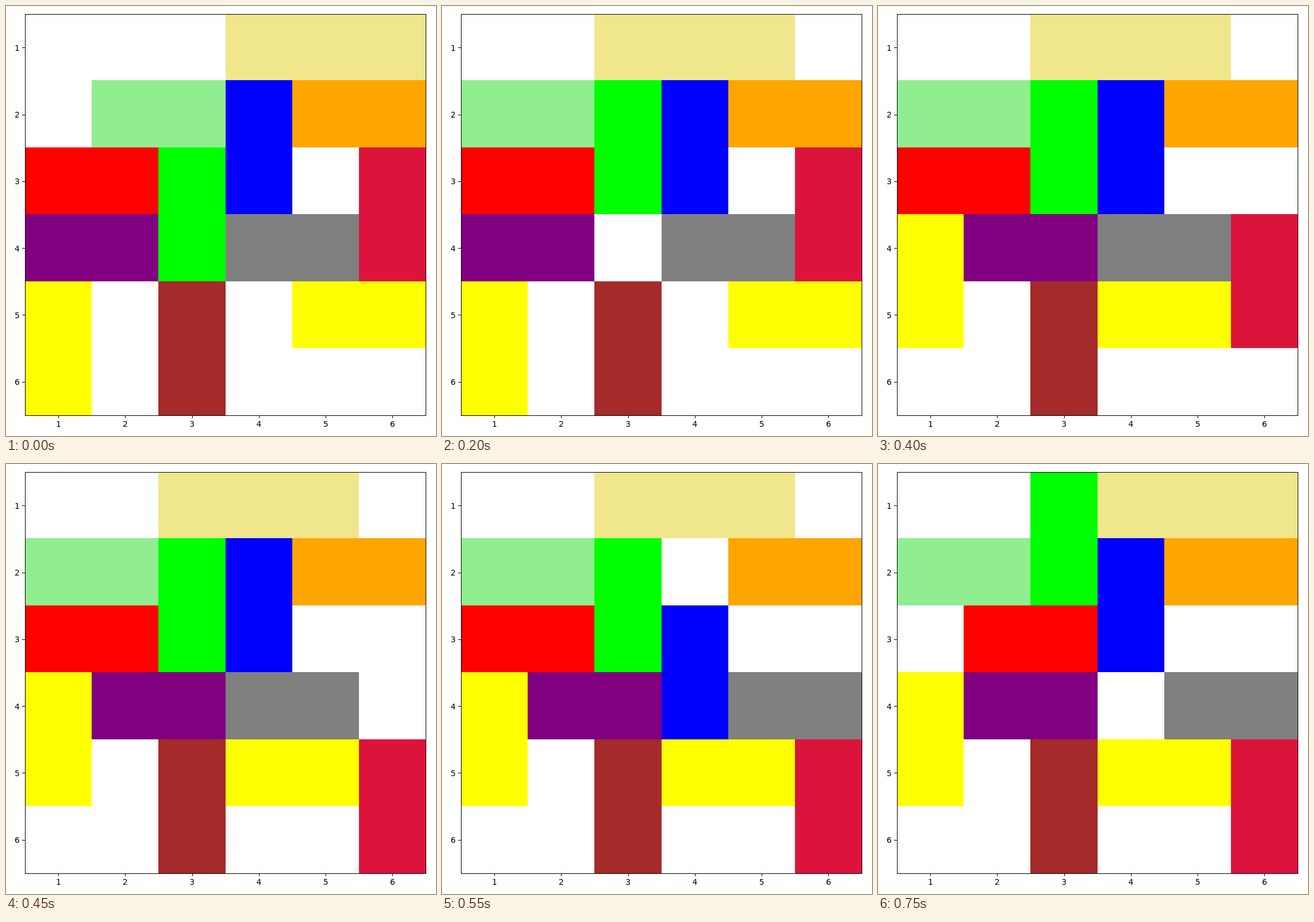
These frames come from a looping animation (748 by 748 pixels, 0.8 s). An HTML page:

```html
<!DOCTYPE html>
<html lang="en">
<head>
<meta charset="utf-8">
<title>Sliding blocks</title>
<style>
  html, body { margin: 0; width: 100%; height: 100%; overflow: hidden; background: #fff; }
  svg { display: block; width: 748px; height: 748px; }
  text { font: 13.89px "DejaVu Sans", sans-serif; text-anchor: middle; }
</style>
</head>
<body>
<svg id="stage" viewBox="0 0 748 748" shape-rendering="crispEdges"></svg>
<script>
const LOOP = 800, FIRST = 100, STEP = 50;
const stage = document.getElementById('stage');

// colour, column, row, columns, rows
const blocks = {
  khaki:   ['#f0e68c', 3, 0, 3, 1],
  mint:    ['#90ee90', 1, 1, 2, 1],
  blue:    ['#0000ff', 3, 1, 1, 2],
  orange:  ['#ffa500', 4, 1, 2, 1],
  red:     ['#ff0000', 0, 2, 2, 1],
  lime:    ['#00ff00', 2, 2, 1, 2],
  crimson: ['#dc143c', 5, 2, 1, 2],
  purple:  ['#800080', 0, 3, 2, 1],
  gray:    ['#808080', 3, 3, 2, 1],
  tall:    ['#ffff00', 0, 4, 1, 2],
  brown:   ['#a52a2a', 2, 4, 1, 2],
  wide:    ['#ffff00', 4, 4, 2, 1]
};

// one move per step; blocks slide along their long side
const moves = [
  ['khaki', -1], ['mint', -1], ['lime', -1], ['purple', 1], ['tall', -1],
  ['wide', -1], ['crimson', 1], ['crimson', 1], ['gray', 1], ['blue', 1],
  ['khaki', 1], ['lime', -1], ['red', 1], ['blue', -1]
];

const edgeX = c => Math.round(33 + 116.2 * c);
const edgeY = r => Math.round(12.9 + 116.5 * r);

function add(tag, attrs, text) {
  const el = document.createElementNS('http://www.w3.org/2000/svg', tag);
  set(el, attrs);
  if (text) el.textContent = text;
  return stage.appendChild(el);
}

function set(el, attrs) {
  for (const k in attrs) el.setAttribute(k, attrs[k]);
}

const rects = {};
for (const name in blocks) rects[name] = add('rect', { fill: blocks[name][0] });

// axes
add('rect', { x: 0, y: 0, width: 748, height: 14, fill: '#fff' });
add('rect', { x: 33.5, y: 14.5, width: 697, height: 697.5, fill: 'none', stroke: '#000' });
for (let i = 0; i < 6; i++) {
  const x = 91.6 + 116.2 * i, y = 72.7 + 116.3 * i;
  add('rect', { x: Math.floor(x), y: 712, width: 1, height: 5 });
  add('rect', { x: 28, y: Math.floor(y), width: 5, height: 1 });
  add('text', { x: x - 0.3, y: 732 }, i + 1);
  add('text', { x: 19.4, y: Math.round(y + 5) }, i + 1);
}

let shown = -1;
function draw(now) {
  const t = now % LOOP;
  const count = t < FIRST ? 0 : Math.floor((t - FIRST) / STEP) + 1;
  if (count !== shown) {
    shown = count;
    const shift = {};
    for (const [name, d] of moves.slice(0, count)) shift[name] = (shift[name] || 0) + d;
    for (const name in blocks) {
      let [, c, r, w, h] = blocks[name];
      const d = shift[name] || 0;
      if (w > h) c += d; else r += d;
      const x = edgeX(c), y = edgeY(r);
      set(rects[name], { x, y, width: edgeX(c + w) - x, height: edgeY(r + h) - y });
    }
  }
}

const start = performance.now();
function tick() {
  draw(performance.now() - start);
  requestAnimationFrame(tick);
}
tick();
</script>
</body>
</html>
```
